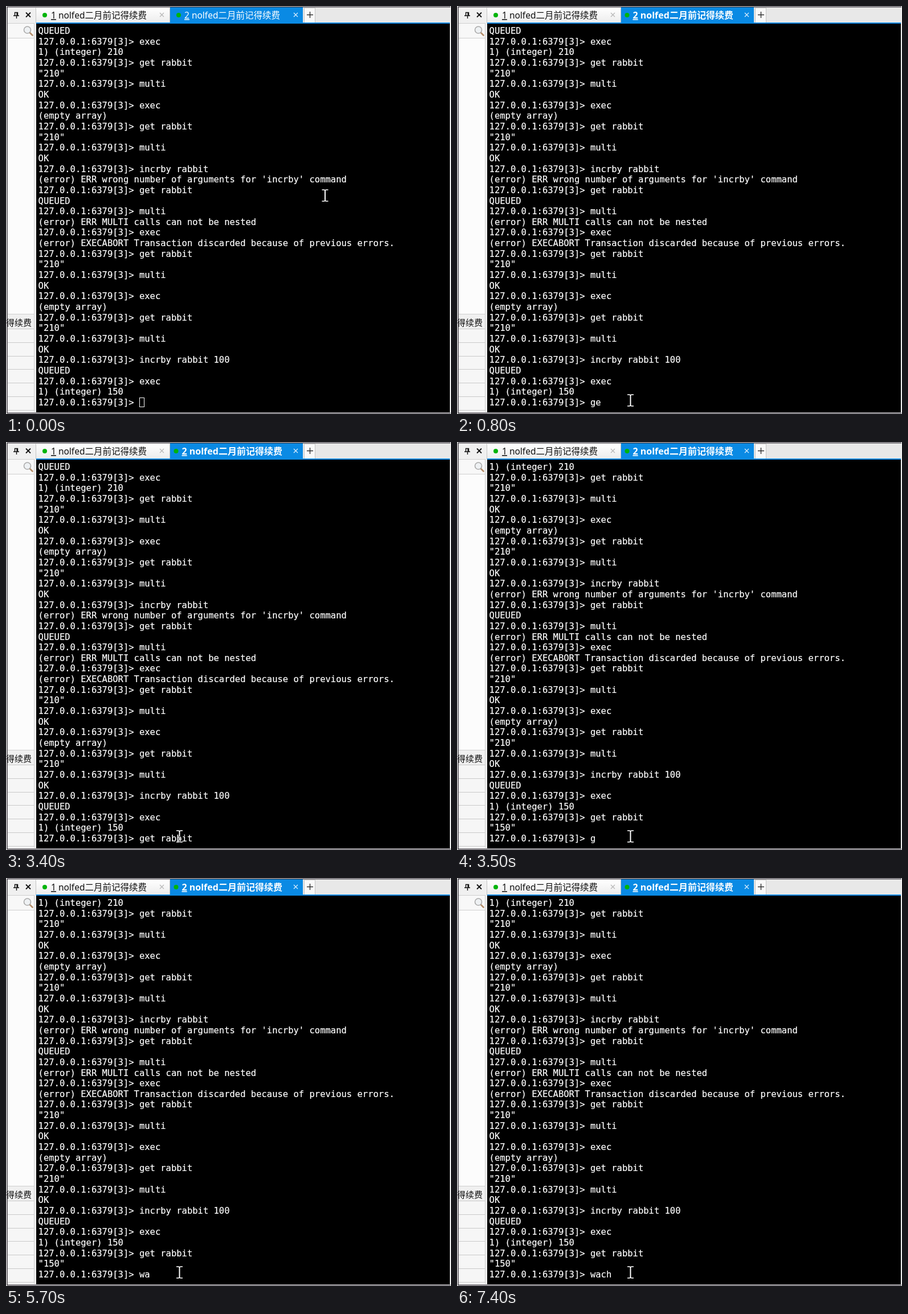
These frames come from a looping animation (781 by 717 pixels, 8000 ms). An HTML page:

```html
<!DOCTYPE html>
<html lang="zh-CN">
<head>
<meta charset="utf-8">
<title>Terminal</title>
<style>
html, body { margin: 0; width: 100%; height: 100%; overflow: hidden; background: #f0f0f0; }
svg { display: block; width: 781px; height: 717px; }
text { white-space: pre; }
.term { font: 15.5px "DejaVu Sans Mono", monospace; fill: #fff; stroke: #fff; stroke-width: .2px; }
.ghost { fill: #666; stroke: none; }
.ui { font: 15.5px "Noto Sans", "Noto Sans CJK SC", sans-serif; fill: #111; }
.side { font-size: 15px; }
.u { text-decoration: underline; }
#beam { mix-blend-mode: difference; }
</style>
</head>
<body>
<svg viewBox="0 0 781 717">
  <defs>
    <linearGradient id="tab" x2="0" y2="1">
      <stop offset="0" stop-color="#fff"/><stop offset="1" stop-color="#ececec"/>
    </linearGradient>
  </defs>
  <rect width="781" height="717" fill="#f0f0f0"/>

  <!-- side panel -->
  <rect x="3" y="31" width="46" height="26" fill="#f8f8f8"/>
  <rect x="3" y="57" width="46" height="484" fill="#fcfcfc"/>
  <rect x="3" y="568" width="46" height="145" fill="#f6f6f6"/>
  <path d="M3 30.5H50M3 56.5H50M3 541.5H50M49.5 31V713" stroke="#cfcfcf" fill="none"/>
  <g id="grid" stroke="#c9c9c9"></g>
  <g stroke="#111" fill="none">
    <path d="M15.5 17V11.5H20.5V17M13 17H23M18.5 17V22" stroke-width="1.4"/>
    <path d="M19.5 11V17" stroke-width="2"/>
    <path d="M35 11.5L43 19.5M43 11.5L35 19.5" stroke-width="1.8"/>
  </g>
  <path d="M41.5 46.5L46.5 51.5" stroke="#b58f6c" stroke-width="2.6" stroke-linecap="round"/>
  <circle cx="37.5" cy="42" r="6" fill="#eef1f3" stroke="#aaa" stroke-width="1.6"/>
  <text class="ui side" x="0" y="561.5">得续费</text>

  <!-- tab strip -->
  <rect x="53" y="2" width="726" height="28" fill="#e8e8e8"/>
  <rect x="53" y="3" width="234" height="27" fill="url(#tab)"/>
  <rect x="288" y="2" width="233" height="28" fill="#0a8ae4"/>
  <rect x="523.5" y="3.5" width="19" height="26" fill="#f9f9f9" stroke="#c4c4c4"/>
  <path d="M52.5 3V30M287.5 3V30" stroke="#c4c4c4"/>
  <path d="M528 15.5H539M533.5 10V21" stroke="#333" stroke-width="1.4"/>
  <circle cx="68" cy="16" r="4" fill="#00b40a"/>
  <text class="ui" x="79" y="22"><tspan class="u">1</tspan> nolfed二月前记得续费</text>
  <g id="active">
    <circle cx="303" cy="16" r="4" fill="#00b40a"/>
    <text class="ui" x="313" y="22" style="fill:#fff"><tspan class="u">2</tspan> nolfed二月前记得续费</text>
  </g>
  <path d="M270 12L277 19M277 12L270 19" stroke="#b5b5b5" stroke-width="1.2"/>
  <path d="M505 12L512 19M512 12L505 19" stroke="#e8f4ff" stroke-width="1.2"/>

  <!-- terminal -->
  <rect x="53" y="30" width="726" height="684"/>
  <rect x="53" y="29" width="726" height="2" fill="#0a8ae4"/>
  <g id="rows" class="term"></g>
  <rect id="caret" x="234.5" y="688.5" width="8" height="16" fill="none" stroke="#fff"/>
  <path d="M780 1.5H2V715.5H780" fill="none" stroke="#3a363e" stroke-width="1.4"/>
  <g id="beam" fill="none" stroke="#fff">
    <path d="M-5.5 -10H-2Q0 -10 0 -8Q0 -10 2 -10H5.5M-5.5 10H-2Q0 10 0 8Q0 10 2 10H5.5" stroke-width="1.5"/>
    <path d="M0 -9V9" stroke-width="2"/>
  </g>
</svg>
<script>
const NS = 'http://www.w3.org/2000/svg';
const LOOP = 8000, ROWS = 36, PITCH = 18.657, BASE = 49;
const PROMPT = '127.0.0.1:6379[3]> ';
const $ = id => document.getElementById(id);

function add(parent, tag, attrs) {
  const el = parent.appendChild(document.createElementNS(NS, tag));
  for (const k in attrs) el.setAttribute(k, attrs[k]);
  return el;
}

// Lines starting with ">" are typed commands.
const log = `QUEUED
>exec
1) (integer) 210
>get rabbit
"210"
>multi
OK
>exec
(empty array)
>get rabbit
"210"
>multi
OK
>incrby rabbit
(error) ERR wrong number of arguments for 'incrby' command
>get rabbit
QUEUED
>multi
(error) ERR MULTI calls can not be nested
>exec
(error) EXECABORT Transaction discarded because of previous errors.
>get rabbit
"210"
>multi
OK
>exec
(empty array)
>get rabbit
"210"
>multi
OK
>incrby rabbit 100
QUEUED
>exec
1) (integer) 150
>get rabbit
"150"`.split('\n').map(s => s.replace(/^>/, PROMPT));

// Start time and the text standing at the prompt.
const typing = [
  [0, ''], [700, 'g'], [800, 'ge'], [1500, 'get tay'], [1800, 'get r'], [1900, 'get ra'],
  [3000, 'get rab'], [3100, 'get rabb'], [3300, 'get rabbi'], [3400, 'get rabbit'],
  [3500, 'g'], [4000, 'w'], [5700, 'wa'], [5800, 'wat'], [6100, 'wathc'], [6200, 'wathch'],
  [6800, 'wathc'], [7000, 'wath'], [7100, 'wat'], [7200, 'wa'], [7300, 'wac'], [7400, 'wach']
];
const FOCUS = 700, ENTER = 3500;

for (let i = 0; i < 7; i++) {
  const y = Math.round(567 + i * 23.8) + .5;
  add($('grid'), 'path', { d: `M3 ${y}H49` });
}
const rows = Array.from({ length: ROWS }, (_, i) =>
  add($('rows'), 'text', { x: 56.6, y: (BASE + i * PITCH).toFixed(2) }));
const ghost = add($('rows'), 'text', { x: 289.5, y: 702, class: 'ghost' });
ghost.textContent = 'y';

const label = $('active').querySelector('text');

function setText(el, s) {
  if (el.textContent !== s) el.textContent = s;
}

function render(t) {
  const typed = typing.findLast(k => k[0] <= t)[1];
  const top = t < ENTER ? 0 : 2;
  rows.forEach((el, i) => setText(el, i < ROWS - 1 ? log[i + top] : PROMPT + typed));
  ghost.style.display = t >= 1800 && t < 3000 ? '' : 'none';

  // The focused tab turns bold and stays centred.
  const focused = t >= FOCUS;
  $('caret').style.display = focused ? 'none' : '';
  $('active').setAttribute('transform', `translate(${focused ? -4.5 : 0} 0)`);
  label.style.fontWeight = focused ? 700 : 400;
  label.style.fontSize = focused ? '16px' : '15.5px';

  // The pointer advances in 100 ms steps.
  const p = Math.min(Math.floor(t / 100) / 6, 1);
  const e = p * p * (3 - 2 * p);
  $('beam').setAttribute('transform', `translate(${560 - 255.5 * e} ${333 + 360 * e})`);
}

const start = performance.now();
function tick() {
  render((performance.now() - start) % LOOP);
  requestAnimationFrame(tick);
}
tick();
</script>
</body>
</html>
```
